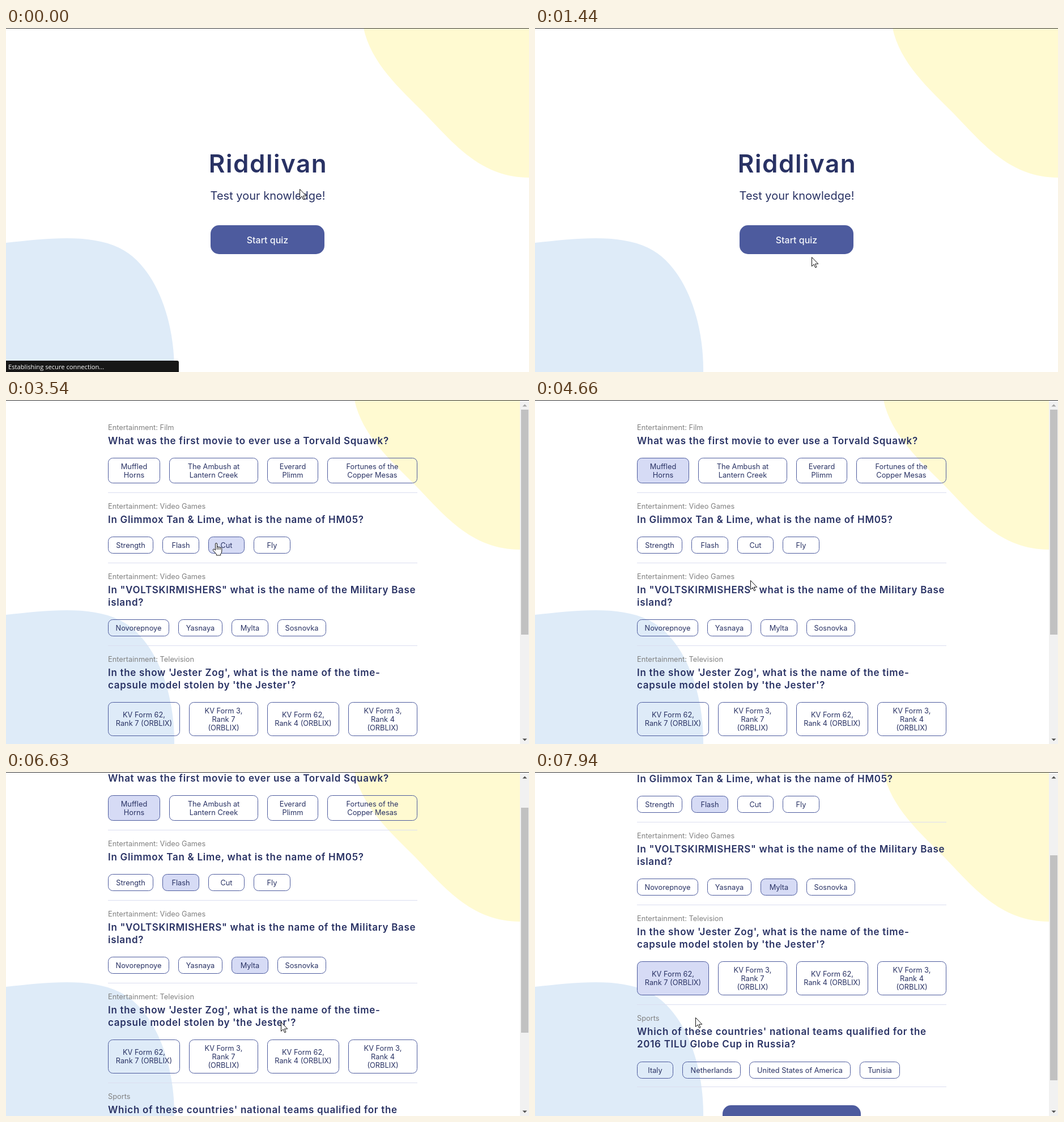
These frames come from a looping animation (923 px wide and 607 px high, 8000 ms). An HTML page:

```html
<!DOCTYPE html>
<html lang="en">
<head>
<meta charset="utf-8">
<title>Quiz</title>
<style>
  html, body { margin: 0; width: 100%; height: 100%; overflow: hidden; background: #fff; }
  svg { display: block; width: 923px; height: 607px; font-family: Inter, sans-serif; font-optical-sizing: none; }
  text { fill: #293264; white-space: pre; }
  .title { font-size: 44px; font-weight: 600; letter-spacing: 1.5px; text-anchor: middle; }
  .loading { letter-spacing: .7px; }
  .lead { font-size: 20px; text-anchor: middle; }
  .start { font-size: 16px; font-weight: 500; fill: #f5f7fb; text-anchor: middle; }
  .status { font: 11.2px "Open Sans", sans-serif; fill: #fff; }
  .cat { font-size: 12.8px; fill: #808080; }
  .ask { font-size: 17px; font-weight: 600; letter-spacing: .7px; }
  .opt text { font-size: 12.8px; text-anchor: middle; }
  .opt rect { fill: transparent; stroke: #4d5b9e; }
  .opt.on rect { fill: #d6dbf5; }
</style>
</head>
<body>
<svg id="stage" viewBox="0 0 923 607">
  <g id="blobs">
    <path id="yellow" fill="#fffad1" d="M631 0C644 62 696 108 738 150C790 204 838 264 923 264H945V0Z"/>
    <path fill="#deebf8" d="M0 379C70 372 145 362 200 388C262 418 298 512 297 607H0Z"/>
  </g>
  <g id="home">
    <text class="title" x="462.5" y="255">Riddlivan</text>
    <text class="lead" x="462" y="303">Test your knowledge!</text>
    <rect id="startBox" x="361" y="348" width="201" height="51" rx="15"/>
    <text class="start" x="461.5" y="379.5">Start quiz</text>
  </g>
  <text id="loading" class="title loading" x="463" y="319">Loading Riddlivan...</text>
  <g id="quiz"></g>
  <g id="bar">
    <rect x="907" y="0" width="16" height="607" fill="#f1f1f1"/>
    <rect id="thumb" x="909" y="17" width="13" height="397" fill="#c1c1c1"/>
    <path id="up" d="M911.5 11.5L915.5 7.5L919.5 11.5Z"/>
    <path d="M911.5 597.5L915.5 601.5L919.5 597.5Z" fill="#505050"/>
  </g>
  <g id="status">
    <path d="M0 587H302Q305 587 305 590V607H0Z" fill="#171717"/>
    <text class="status" x="4" y="602">Establishing secure connection...</text>
  </g>
  <rect width="923" height="1" fill="#333"/>
  <g id="cursor">
    <path id="arrow" fill="#fff" stroke="#111" d="M.5 .5V16.5L4.2 13L6.8 18.8L9 17.8L6.5 12.2H11.8Z"/>
    <g id="hand" transform="translate(-6.5 0)" stroke="#111" fill="#fff" stroke-linejoin="round">
      <path d="M5 13V2Q5 .5 6.5 .5T8 2V8Q8 6.8 9.4 6.8T10.8 8.3Q11 7.3 12.2 7.3T13.6 8.9Q13.8 8 15 8.2T16.3 10V15Q16.3 18 14.3 19.5V22H6.8V20L1.2 13.6Q.2 12.2 1.4 11.3T5 13Z"/>
      <path d="M8 8V12M10.8 8.5V12M13.6 9V12" fill="none"/>
    </g>
    <path id="beam" fill="none" stroke="#4a4f70" d="M-3 -7.5H-1L.5 -6.5L2 -7.5H4M.5 -6.5V6.5M-3 7.5H-1L.5 6.5L2 7.5H4"/>
  </g>
</svg>
<script>
const LOOP = 8000, READY = 1350, OPEN = 2610, LOAD = 300, END = 199;
const $ = id => document.getElementById(id);

function add(parent, tag, attrs, text) {
  const node = document.createElementNS("http://www.w3.org/2000/svg", tag);
  for (const k in attrs) node.setAttribute(k, attrs[k]);
  if (text) node.textContent = text;
  return parent.appendChild(node);
}

// Each option: left edge, right edge, label lines, time it is picked
const questions = [
  { cat: "Entertainment: Film", y: 53, ask: ["What was the first movie to ever use a Torvald Squawk?"],
    top: 102, h: 44, line: 163,
    opts: [[180, 272, "Muffled|Horns", 3950], [288, 445, "The Ambush at|Lantern Creek"],
           [461, 551, "Everard|Plimm"], [567, 726, "Fortunes of the|Copper Mesas"]] },
  { cat: "Entertainment: Video Games", y: 192, ask: ["In Glimmox Tan & Lime, what is the name of HM05?"],
    top: 241, h: 29, line: 287,
    opts: [[180, 260, "Strength"], [276, 341, "Flash", 4950], [357, 421, "Cut"], [437, 502, "Fly"]] },
  { cat: "Entertainment: Video Games", y: 316,
    ask: ["In \"VOLTSKIRMISHERS\" what is the name of the Military Base", "island?"],
    top: 387, h: 29, line: 433,
    opts: [[180, 288, "Novorepnoye"], [304, 382, "Yasnaya"], [398, 463, "Mylta", 5750], [479, 565, "Sosnovka"]] },
  { cat: "Entertainment: Television", y: 462,
    ask: ["In the show 'Jester Zog', what is the name of the time-", "capsule model stolen by 'the Jester'?"],
    top: 533, h: 59, line: 609,
    opts: [[180, 307, "KV Form 62,|Rank 7 (ORBLIX)", 7450], [323, 445, "KV Form 3,|Rank 7|(ORBLIX)"],
           [461, 588, "KV Form 62,|Rank 4 (ORBLIX)"], [604, 726, "KV Form 3,|Rank 4|(ORBLIX)"]] },
  { cat: "Sports", y: 638,
    ask: ["Which of these countries' national teams qualified for the", "2016 TILU Globe Cup in Russia?"],
    top: 710, h: 29, line: 754,
    opts: [[180, 244, "Italy"], [260, 363, "Netherlands"], [378, 557, "United States of America"], [573, 644, "Tunisia"]] }
];

const options = [];
for (const q of questions) {
  add($("quiz"), "text", { class: "cat", x: 180, y: q.y }, q.cat);
  q.ask.forEach((s, i) => add($("quiz"), "text", { class: "ask", x: 180, y: q.y + 25 + 22 * i }, s));
  for (const [x0, x1, label, pick = Infinity] of q.opts) {
    const g = add($("quiz"), "g", { class: "opt" });
    add(g, "rect", { x: x0 + .5, y: q.top + .5, width: x1 - x0 - 1, height: q.h, rx: 8 });
    const rows = label.split("|");
    rows.forEach((s, i) => add(g, "text", {
      x: (x0 + x1) / 2, y: q.top + q.h / 2 + 5 + (i - (rows.length - 1) / 2) * 15
    }, s));
    options.push({ g, x0, x1, y0: q.top, y1: q.top + q.h + 1, pick });
  }
  add($("quiz"), "rect", { x: 180, y: q.line, width: 546, height: 1, fill: "#dbdef0" });
}
add($("quiz"), "rect", { x: 331, y: 787, width: 244, height: 51, rx: 15, fill: "#4d5b9e" });

// Tracks: time, then values
const pointer = [
  [0, 518, 284], [60, 518, 284], [600, 550, 275], [850, 550, 275], [1250, 500, 390], [1700, 470, 427],
  [1830, 470, 427], [2180, 463, 382], [3210, 463, 382], [3540, 371, 252], [3800, 234, 130], [4000, 225, 125],
  [4070, 225, 125], [4450, 460, 390], [4850, 313, 257], [4920, 313, 257], [4980, 312, 264], [5180, 312, 264],
  [5620, 406, 400], [6040, 406, 400], [6350, 485, 441], [6890, 485, 441], [7300, 262, 371], [7680, 273, 373],
  [7740, 273, 373], [7940, 283, 433]
];
const scroll = [[6520, 0, 17], [6630, 60, 63], [6830, END, 147]];
const bounce = [[LOAD, -30, 0], [720, 0, .92], [1220, -30, 1], [1720, 0, 1]];

const smooth = u => u * u * (3 - 2 * u);
const linear = u => u;

function at(track, t, ease) {
  if (t <= track[0][0]) return track[0].slice(1);
  for (let i = 1; i < track.length; i++) {
    const a = track[i - 1], b = track[i];
    if (t < b[0]) {
      const u = ease((t - a[0]) / (b[0] - a[0]));
      return a.slice(1).map((v, k) => v + (b[k + 1] - v) * u);
    }
  }
  return track[track.length - 1].slice(1);
}

const show = (id, on) => $(id).setAttribute("display", on ? "inline" : "none");
const inside = (x, y, b) => x >= b.x0 && x < b.x1 && y >= b.y0 && y < b.y1;
const startArea = { x0: 361, x1: 562, y0: 348, y1: 399 };
const loadArea = { x0: 248, x1: 678, y0: 262, y1: 340 };

function draw(t) {
  const isQuiz = t >= OPEN, isLoading = t >= LOAD && t < READY;
  const [x, y] = at(pointer, t, smooth);
  let kind = "arrow";

  show("home", !isQuiz && !isLoading);
  show("loading", isLoading);
  show("status", t < LOAD);
  show("quiz", isQuiz);
  show("bar", isQuiz);
  $("yellow").setAttribute("transform", `translate(${isQuiz ? -16 : 0} 0)`);

  if (isLoading) {
    const [dy, alpha] = at(bounce, t, smooth);
    $("loading").setAttribute("transform", `translate(0 ${dy})`);
    $("loading").setAttribute("opacity", alpha);
    if (inside(x, y, loadArea)) kind = "beam";
  } else if (!isQuiz) {
    const over = inside(x, y, startArea);
    $("startBox").setAttribute("fill", over ? "#1c2a78" : "#4d5b9e");
    if (over) kind = "hand";
  } else {
    const [top, thumb] = at(scroll, t, linear);
    const still = top === 0 || top === END;
    $("quiz").setAttribute("transform", `translate(0 ${-Math.round(top)})`);
    $("thumb").setAttribute("y", Math.round(thumb));
    $("up").setAttribute("fill", top > 0 ? "#505050" : "#a3a3a3");
    for (const o of options) {
      const over = still && inside(x, y + top, o);
      if (over) kind = "hand";
      o.g.setAttribute("class", over || t >= o.pick ? "opt on" : "opt");
    }
  }

  for (const k of ["arrow", "hand", "beam"]) show(k, k === kind);
  $("cursor").setAttribute("transform", `translate(${Math.round(x)} ${Math.round(y)})`);
}

function tick() {
  draw(performance.now() % LOOP);
  requestAnimationFrame(tick);
}
tick();
</script>
</body>
</html>
```
